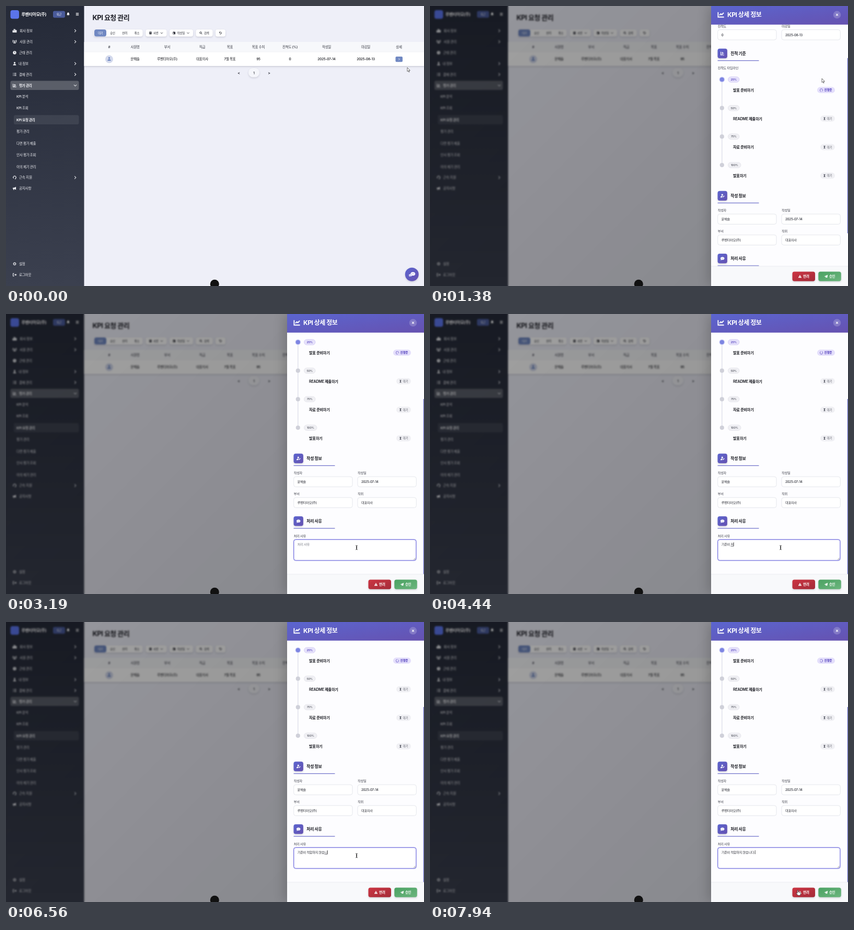
An HTML page for the animation above (8000 ms loop, 800 px wide and 537 px high).

```html
<!DOCTYPE html>
<html lang="ko">
<head>
<meta charset="utf-8">
<title>KPI 요청 관리</title>
<style>
html, body { margin: 0; width: 100%; height: 100%; overflow: hidden; background: #eeeff8 }
#stage { position: relative; width: 800px; height: 537px; overflow: hidden }
#stage > * { position: absolute; left: 0; top: 0 }
svg { display: block; overflow: hidden }
text { font-family: Inter, 'Noto Sans CJK KR', 'Noto Sans CJK', sans-serif; letter-spacing: -.04em; white-space: pre }
#veil { width: 800px; height: 537px; background: linear-gradient(135deg, rgba(0,0,0,.37), rgba(0,0,0,.44)); backdrop-filter: blur(1.4px); animation: veil 8s infinite }
#stage > #drawer { left: 538px; width: 262px; height: 537px; background: #fdfdff; box-shadow: -4px 0 22px rgba(0,0,0,.2); animation: slide 8s infinite }
.scroll { animation: scroll 8s infinite }
.thumb { animation: thumb 8s infinite }
.spin { animation: spin 2s linear infinite }
.focus { animation: focus 8s step-end infinite }
.cursor { animation: move 8s infinite ease-in-out }
.arrow { animation: arrow 8s step-end infinite }
.beam { animation: beam 8s step-end infinite }
.hand { animation: hand 8s step-end infinite }
@keyframes veil { 0%, 5.6% { opacity: 0 } 9.5%, 100% { opacity: 1 } }
@keyframes slide { 0%, 5.6% { transform: translateX(120%); animation-timing-function: cubic-bezier(.2,.7,.3,1) } 10%, 100% { transform: none } }
@keyframes scroll { 0%, 13.5% { transform: translateY(87px); animation-timing-function: ease-in-out } 21%, 100% { transform: translateY(-88px) } }
@keyframes thumb { 0%, 13.5% { transform: none; animation-timing-function: ease-in-out } 21%, 100% { transform: translateY(127px) } }
@keyframes spin { from { transform: rotate(-79deg) } to { transform: rotate(281deg) } }
@keyframes focus { 0% { opacity: 0 } 33.5%, 100% { opacity: 1 } }
@keyframes move {
  0% { transform: translate(768px,118px) } 4%, 9% { transform: translate(754px,102px) }
  17.25% { transform: translate(750px,139px) } 21% { transform: translate(748px,144px) }
  26.6%, 28% { transform: translate(669px,416px) } 32%, 88% { transform: translate(671px,448px) }
  95%, 100% { transform: translate(704px,514px) }
}
@keyframes arrow { 0% { opacity: 1 } 3.5% { opacity: 0 } 7% { opacity: 1 } 30% { opacity: 0 } 90.3% { opacity: 1 } 93.8%, 100% { opacity: 0 } }
@keyframes beam { 0% { opacity: 0 } 30% { opacity: 1 } 90.3%, 100% { opacity: 0 } }
@keyframes hand { 0% { opacity: 0 } 3.5% { opacity: 1 } 7% { opacity: 0 } 93.8%, 100% { opacity: 1 } }
</style>
</head>
<body>
<div id="stage">
  <svg id="page" width="800" height="537">
    <defs>
      <linearGradient id="side" x2="0" y2="1"><stop stop-color="#252a38"/><stop offset="1" stop-color="#3b404f"/></linearGradient>
      <linearGradient id="violet" x2="1" y2="1"><stop stop-color="#5b65cf"/><stop offset="1" stop-color="#6652b0"/></linearGradient>
      <linearGradient id="red" x2="1" y2="1"><stop stop-color="#cc3543"/><stop offset="1" stop-color="#a32b38"/></linearGradient>
      <linearGradient id="green" x2="1" y2="1"><stop stop-color="#4aa262"/><stop offset="1" stop-color="#6cb57e"/></linearGradient>
      <filter id="soft" x="-30%" y="-30%" width="160%" height="180%"><feDropShadow dx="0" dy="1.5" stdDeviation="1.6" flood-color="#445" flood-opacity=".22"/></filter>
      <clipPath id="view"><path d="M538 36h262v463h-262z"/></clipPath>
    </defs>
  </svg>
  <div id="veil"></div>
  <div id="drawer"><svg id="panel" width="262" height="537" viewBox="538 0 262 537"></svg></div>
  <svg id="top" width="800" height="537"></svg>
</div>
<script>
const COMPANY = '루벤티아모(주)', PERSON = '문해솔';
const INK = '#23252e', VIOLET = '#5c5fc4';

const SOLID = {
  building: 'M-4-.8h2v-2.4h3.2v1.8h2.8v4.6h-8zM-1.3-2.2v1h.8v-1zM-1.3-.2v1h.8v-1zM2-.2v1h.8v-1z',
  users: 'M-1.3-1a1.3 1.3 0 1 1 2.6 0a1.3 1.3 0 1 1-2.6 0M-2.4 3c0-3 4.8-3 4.8 0zM-4-2.2a1 1 0 1 1 2 0a1 1 0 1 1-2 0M2-2.2a1 1 0 1 1 2 0a1 1 0 1 1-2 0M-4.3.7c0-2 2.4-2 2.4-.4l-.8.7zM4.3.7c0-2-2.4-2-2.4-.4l.8.7z',
  clock: 'M-3.2 0a3.2 3.2 0 1 1 6.4 0a3.2 3.2 0 1 1-6.4 0M-.4-2v2.3l1.6 1 .4-.6-1.2-.8v-1.9z',
  user: 'M-1.6-1.6a1.6 1.6 0 1 1 3.2 0a1.6 1.6 0 1 1-3.2 0M-2.9 3.2c0-3.7 5.8-3.7 5.8 0z',
  horn: 'M-3.5-1.4h2.5l3.6-1.8v5.6l-3.6-1.6h-.4l.6 2.2h-1.3l-.7-2.2h-.7z',
  bell: 'M-2.8 1.8c1-1 .8-2 .9-2.8c.2-2.6 3.6-2.6 3.8 0c.1.8-.1 1.8.9 2.8zM-.9 2.3h1.8c-.2 1-1.6 1-1.8 0z',
  doc: 'M-2.3-2.8h4.6v5.6h-4.6zM-1-1.6v.8h2v-.8zM-1 0v.7h2v-.7z',
  calendar: 'M-2.6-2.4h1v-.7h.8v.7h1.6v-.7h.8v.7h1v5.2h-5.2zM-1.8-.8v2.6h1.5v-2.6z',
  warn: 'M0-2.9l3.2 5.6h-6.4zM-.4-.9v1.7h.8v-1.7zM-.4 1.3v.7h.8v-.7z',
  plane: 'M3.2-3l-1 5.6-2-.8-1 1.2v-1.8l2.6-2.8-3.2 2.4-1.8-.8z',
  bubble: 'M-3.6-.3c0-3.6 7.2-3.6 7.2 0c0 2.4-2.8 3-4.4 2.5c-.8.6-1.6.9-2.6.8c.4-.5.7-1 .7-1.5c-.6-.5-.9-1.1-.9-1.8zM-2-.6v.8h.8v-.8zM-.4-.6v.8h.8v-.8zM1.2-.6v.8h.8v-.8z',
  hourglass: 'M-2-2.9h4v.7h-.5c0 1.2-.6 1.7-1 2.2c.4.5 1 1 1 2.2h.5v.7h-4v-.7h.5c0-1.2.6-1.7 1-2.2c-.4-.5-1-1-1-2.2h-.5z',
  edit: 'M-2-1.8a1.6 1.6 0 1 1 3.2 0a1.6 1.6 0 1 1-3.2 0M-3.6 3c0-3 3.2-3.2 4.4-2.3l-1.4 1.5v.8zM.3 3l.3-1.2 2.4-2.3.9.9-2.4 2.3z'
};
const LINE = {
  list: 'M-3.2-2.3h1.2M-.8-2.3h4M-3.2 0h1.2M-.8 0h4M-3.2 2.3h1.2M-.8 2.3h4',
  chart: 'M-3-3v5.8h6.2M-1.2-1.8h2.4M-1.2-.2h3.8M-1.2 1.3h1.6',
  trend: 'M-3.2-2.8v5.4h6.4M-1.7.6l1.5-1.6 1.1 1 2-2.2',
  headset: 'M-2.8 1v-1.2c0-3.6 5.6-3.6 5.6 0v1.2M-2 0v1.6M2 0v1.6M2.4 1.8c-.3.8-1 1-2 1',
  gear: 'M-1.9 0a1.9 1.9 0 1 1 3.8 0a1.9 1.9 0 1 1-3.8 0M0-3.1v1M0 2.1v1M-3.1 0h1M2.1 0h1M-2.2-2.2l.7.7M1.5 1.5l.7.7M-2.2 2.2l.7-.7M1.5-1.5l.7-.7',
  exit: 'M-.8-2.5h-2.2v5h2.2M-1 0h4M1.4-1.7l1.7 1.7-1.7 1.7',
  menu: 'M-2.7-2h5.4M-2.7 0h5.4M-2.7 2h5.4',
  right: 'M-1.3-2.6l2.6 2.6-2.6 2.6', down: 'M-2.6-1.3l2.6 2.6 2.6-2.6',
  cross: 'M-2-2l4 4M2-2l-4 4',
  search: 'M-2.4-.6a1.9 1.9 0 1 1 3.8 0a1.9 1.9 0 1 1-3.8 0M.9 1l1.7 1.7',
  undo: 'M-2.4-2.6v1.8h1.8M-2.2-1c1.6-2.4 4.8-1 4.6 1.2c-.2 2-2.6 2.8-4.2 1.4',
  target: 'M-3 0a3 3 0 1 1 6 0a3 3 0 1 1-6 0M-1.2 0a1.2 1.2 0 1 1 2.4 0a1.2 1.2 0 1 1-2.4 0'
};
const icon = (name, x, y, color = '#e6e8ee', scale = 1) => {
  const paint = name in LINE ? `fill="none" stroke="${color}" stroke-width="1.05"` : `fill="${color}" fill-rule="evenodd"`;
  return `<path transform="translate(${x} ${y}) scale(${scale})" d="${LINE[name] || SOLID[name]}" ${paint}/>`;
};
// y is the vertical middle of the line
const text = (s, x, y, size = 6.5, color = INK, weight = 500, anchor = 'start') =>
  `<text x="${x}" y="${y + size * .36}" font-size="${size}" fill="${color}" font-weight="${weight}" text-anchor="${anchor}">${s}</text>`;
const mid = (s, x, y, size, color, weight) => text(s, x, y, size, color, weight, 'middle');
const box = (x, y, w, h, r, fill, extra = '') => `<rect x="${x}" y="${y}" width="${w}" height="${h}" rx="${r}" fill="${fill}" ${extra}/>`;
const dot = (x, y, r, fill, extra = '') => `<circle cx="${x}" cy="${y}" r="${r}" fill="${fill}" ${extra}/>`;
const SOFT = 'filter="url(#soft)"';
const add = (id, ...parts) => document.getElementById(id).insertAdjacentHTML('beforeend', parts.flat().join(''));

function sidebar() {
  const pale = '#f0f1f5';
  const menu = [
    ['building', '회사 정보', 47.5, 26, 'right'], ['users', '사원 관리', 68.5, 26, 'right'], ['clock', '근태 관리', 89.5, 25],
    ['user', '내 정보', 110.5, 24, 'right'], ['list', '결재 관리', 131.2, 25, 'right'], ['chart', '평가 관리', 152.3, 25, 'down'],
    ['headset', '근속 지원', 329, 25, 'right'], ['horn', '공지사항', 350, 25], ['gear', '설정', 494.5, 25], ['exit', '로그아웃', 515.5, 25]
  ];
  const sub = ['KPI 분석', 'KPI 조회', 'KPI 요청 관리', '평가 관리', '다면 평가 제출', '인사 평가 조회', '이의 제기 관리'];
  return [
    box(0, 0, 149.5, 537, 0, 'url(#side)'),
    box(8.5, 8, 16.5, 16.5, 4, '#5b74ea'),
    text(COMPANY, 29.5, 16, 8, '#fff', 700),
    box(90, 9.5, 23, 13, 3, '#495a9a'), mid('퇴근', 101.5, 16, 5.2, '#fff', 500),
    icon('bell', 119, 15.5, '#fff'), icon('menu', 136.5, 15.7, '#fff'),
    box(8.5, 143.5, 131, 17.5, 3, '#fff', 'fill-opacity=".22"'),
    box(15, 209.3, 124.5, 17.7, 3, '#fff', 'fill-opacity=".08"'),
    menu.map(([name, label, y, x, arrow]) => icon(name, 16.5, y, pale) + text(label, x, y, 6.6, pale, label === '평가 관리' ? 700 : 500) + (arrow ? icon(arrow, 132.5, y, pale) : '')),
    sub.map((label, i) => text(label, 20, 173.3 + i * 22.5, 6.5, pale, i === 2 ? 700 : 500))
  ];
}

function table() {
  const columns = [
    ['#', 197.5], ['사원명', 247, PERSON], ['부서', 308.5, COMPANY], ['직급', 375.5, '대표이사'], ['목표', 428.5, '7월 목표'], ['목표 수치', 483, '95'],
    ['진척도 (%)', 543.5, '0'], ['작성일', 613.5, '2025-07-14'], ['마감일', 688.5, '2025-08-13'], ['상세', 752]
  ];
  const chip = (x, w) => box(x, 45, w, 13.5, 4, '#fff', SOFT);
  return [
    text('KPI 요청 관리', 165.5, 22.3, 13, '#1c1d25', 700),
    chip(168.5, 93), box(169, 45, 23, 13.5, 4, '#7088c2'),
    ['대기', '승인', '반려', '취소'].map((s, i) => mid(s, 180.7 + i * 23.3, 51.8, 5.4, i ? INK : '#fff', 500)),
    chip(267.5, 40), icon('doc', 276.5, 51.8, INK, .9), text('사번', 282, 51.8, 5.5), icon('down', 298, 51.8, INK, .8),
    chip(313, 45), icon('calendar', 321.7, 51.8, INK, .9), text('작성일', 327.5, 51.8, 5.5), icon('down', 348.5, 51.8, INK, .8),
    chip(363.5, 32), icon('search', 373, 51.8, INK, .9), text('검색', 379, 51.8, 5.5),
    chip(401, 19), icon('undo', 410.5, 51.8, INK, .85),
    box(149.5, 69, 651, 20, 0, '#f7f8fb'),
    box(149.5, 88.5, 651, 26.5, 0, '#fff', SOFT),
    columns.map(([head, x, value]) => mid(head, x, 78.3, 6.5, '#33353f') + (value ? mid(value, x, 101.8, 6.5, '#15161c') : '')),
    dot(197.5, 102, 7.5, '#d3d9ec'), icon('user', 197.5, 101.6, '#7088c2', 1.1),
    box(745.5, 97, 13.5, 10.3, 2, '#7088c2'), icon('right', 752.3, 102.1, '#fff', .75),
    box(464, 119, 21, 17.5, 8.7, '#f5f6fb', SOFT),
    mid('&lt;', 445.5, 128.3, 7, INK, 600), mid('1', 474.5, 128.3, 6.5), mid('&gt;', 503.5, 128.3, 7, INK, 600),
    dot(776.8, 514.8, 13, 'url(#violet)', SOFT), icon('bubble', 778.8, 514, '#fff', 1.25), icon('bubble', 774, 516.5, '#e3e3fa', .85)
  ];
}

const section = (name, title, y) => [
  box(550.5, y - 9.2, 18.4, 18.4, 4, 'url(#violet)', SOFT), icon(name, 559.7, y, '#fff', 1.05),
  text(title, 575.3, y, 7.8, '#17181f', 700), box(550.5, y + 13.2, 79, 1.1, 0, VIOLET)
];
const field = (x, label, value, y) => [
  text(label, x, y, 6.2, '#3b3d47'), box(x, y + 7, 112.3, 19.5, 4, '#fff', 'stroke="#dfe1e8" stroke-width=".8"'), text(value, x + 7, y + 16.8, 6.2, '#2b2d36')
];
const row = (y, a, b) => [field(550.7, ...a, y), field(673, ...b, y)];

function step(percent, title, i) {
  const y = 142 + i * 54.7, active = !i, tint = active ? '#5340bd' : '#62646f';
  const tagWidth = percent === '100%' ? 24.5 : 21.5, pillX = active ? 741 : 747;
  return [
    active ? dot(558.8, y, 5.4, '#cfd1f6') : '', dot(558.8, y, 4.1, active ? '#7d85e2' : '#cfd0d9'),
    box(570.5, y - 5.2, tagWidth, 10.4, 5.2, active ? '#e6e2fb' : '#f0f0f4', `stroke="${active ? '#cfc8f3' : '#dedfe6'}" stroke-width=".7"`),
    mid(percent, 570.5 + tagWidth / 2, y, 5.4, tint, 600),
    text(title, 580, y + 20.5, 7.2, '#17181f', 600),
    box(pillX, y + 14.3, 775 - pillX, 11.8, 5.9, active ? '#e4dffb' : '#f0f0f4'),
    active ? `<g transform="translate(749 ${y + 20.4})"><path class="spin" d="M-1-2.4a2.6 2.6 0 1 0 2 0" fill="none" stroke="${tint}" stroke-width=".8"/></g>` : icon('hourglass', 755, y + 20.3, tint, .9),
    text(active ? '진행중' : '대기', active ? 754.5 : 759.5, y + 20.3, 5.6, tint, active ? 600 : 500)
  ];
}

function drawer() {
  const steps = [['25%', '발표 준비하기'], ['50%', 'README 제출하기'], ['75%', '자료 준비하기'], ['100%', '발표하기']];
  return [
    '<g clip-path="url(#view)"><g class="scroll">',
    section('target', 'KPI 정보', -29),
    row(-1, ['목표', '7월 목표'], ['목표 수치', '95']),
    row(39.5, ['진척도', '0'], ['마감일', '2025-08-13']),
    section('chart', '진척 기준', 92),
    text('진척도 타임라인', 550.7, 119.5, 6.2, '#3b3d47'),
    box(557.9, 142, 1.8, 164, 0, '#e4e5ee'),
    steps.map(([percent, title], i) => step(percent, title, i).join('')),
    section('edit', '작성 정보', 365),
    row(393, ['작성자', PERSON], ['작성일', '2025-07-14']),
    row(433, ['부서', COMPANY], ['직위', '대표이사']),
    section('bubble', '처리 사유', 485.3),
    text('처리 사유', 550.7, 513.3, 6.2, '#3b3d47'),
    box(550.7, 520.5, 234.3, 40.2, 4, '#fff', 'stroke="#dfe1e8" stroke-width=".8"'),
    '<g class="focus">', box(550.7, 520.5, 234.3, 40.2, 4, 'none', 'stroke="#dcdcfa" stroke-width="2.6"'),
    box(550.7, 520.5, 234.3, 40.2, 4, 'none', 'stroke="#7773dc" stroke-width="1"'), '</g>',
    '<path d="M780 559.3l3.6-3.6M782 559.3l1.6-1.6" stroke="#666" stroke-width=".6"/>',
    '<text id="reason" x="557.7" y="532" font-size="6.2" font-weight="500"></text>',
    '<path id="caret" d="M.3 525.8v7.4" stroke="#222" stroke-width=".7"/>',
    '</g></g>',
    box(798.8, 36, 1.2, 336, 0, '#6468c6', 'class="thumb"'),
    box(538, 0, 262, 35.7, 0, 'url(#violet)'),
    icon('trend', 557, 16.7, '#fff', 1.75), text('KPI 상세 정보', 569, 16.7, 12, '#fff', 700),
    dot(779, 16.8, 7.3, '#fff', 'fill-opacity=".2"'), icon('cross', 779, 16.8, '#fff'),
    box(538, 499, 262, 38, 0, '#f8f9fb'), box(538, 498.7, 262, .7, 0, '#e4e6ec'),
    box(693.5, 509.5, 43.5, 18.3, 4, 'url(#red)', SOFT), icon('warn', 708, 518.5, '#fff'), text('반려', 714.3, 518.6, 6.4, '#fff', 600),
    box(743.3, 509.5, 43.5, 18.3, 4, 'url(#green)', SOFT), icon('plane', 758, 518.6, '#fff'), text('승인', 764, 518.6, 6.4, '#fff', 600)
  ];
}

add('page', sidebar(), table());
add('panel', drawer());
add('top', dot(399.3, 533.3, 8.5, '#111'), `<g class="cursor">
  <path class="arrow" d="M0 0v7.6l1.8-1.6 1.2 2.8 1.2-.5-1.2-2.7h2.4z" fill="#fff" stroke="#333" stroke-width=".7"/>
  <path class="beam" d="M-1.8-4q1.8 0 1.8 1v6q0 1-1.8 1M1.8-4q-1.8 0-1.8 1v6q0 1 1.8 1M-1 0h2" fill="none" stroke="#222" stroke-width=".9"/>
  <path class="hand" d="M-.9.8q.9-1.4 1.8 0v3l3.6.9q1.2.4 1 1.8l-.8 3.8h-4.6l-3-3.9q0-1.3 1.2-.8l.8.7z" fill="#fff" stroke="#222" stroke-width=".7"/></g>`);

// Hangul input, one entry per keystroke
const strokes = [
  ['', 'ㄱ 기 깆 기주 기준 기준ㅇ 기준이'],
  ['기준이 ', 'ㅈ 저 적 적ㅎ 적하 적합 적합ㅎ 적합하 적합핮 적합하지'],
  ['기준이 적합하지 ', 'ㅇ 아 안 않 않ㅅ 않스 않습 않습ㄴ 않습니 않습닏 않습니다 않습니다.']
].flatMap(([done, word]) => [done, ...word.split(' ').map(s => done + s)]);
const CLICK = 2680, FIRST_KEY = 3340, KEY_GAP = 118;
const reason = document.getElementById('reason'), caret = document.getElementById('caret');
let start, shown;

function frame(now) {
  start ??= now;
  const t = (now - start) % 8000;
  const count = Math.max(0, Math.min(strokes.length - 1, Math.floor((t - FIRST_KEY) / KEY_GAP) + 1));
  if (count !== shown) {
    const s = strokes[shown = count], composing = /[^ .]$/.test(s);
    reason.setAttribute('fill', s ? '#2b2d36' : '#777a85');
    reason.innerHTML = !s ? '처리 사유' : composing ? `${s.slice(0, -1)}<tspan text-decoration="underline">${s.slice(-1)}</tspan>` : s;
    caret.setAttribute('transform', `translate(${557.7 + (s ? reason.getComputedTextLength() : 0)} 0)`);
  }
  const last = count ? FIRST_KEY + (count - 1) * KEY_GAP : CLICK;
  caret.style.opacity = t >= CLICK && (t - last) % 1000 < 500 ? 1 : 0;
  requestAnimationFrame(frame);
}
requestAnimationFrame(frame);
</script>
</body>
</html>
```
